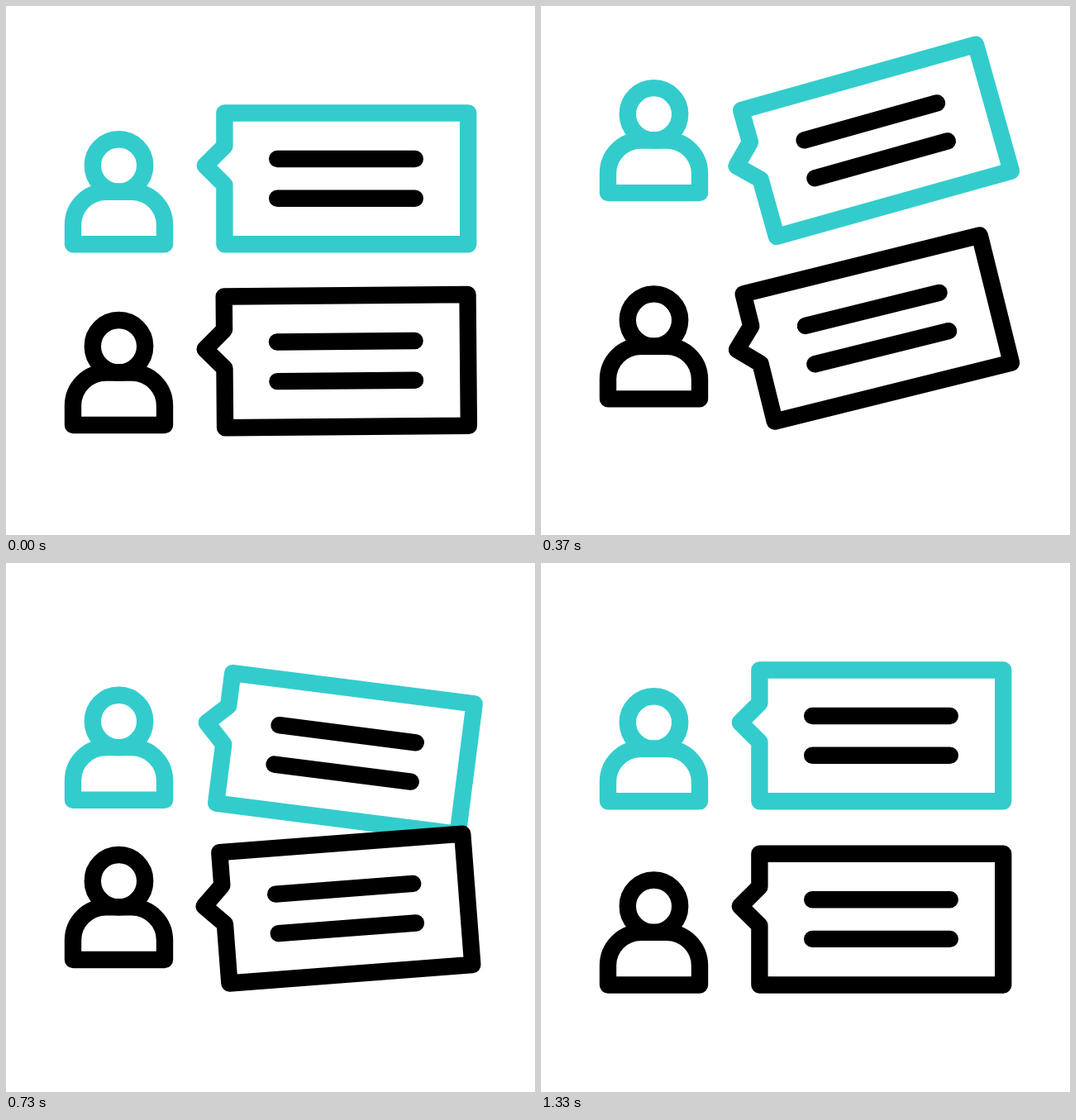
An HTML page with a canvas that plays this animation: 640x640 px, repeating every 1670 ms.

```html
<!DOCTYPE html>
<html lang="en">
<head>
<meta charset="utf-8">
<title>Chat bubbles</title>
<style>
  html, body { margin: 0; width: 100%; height: 100%; overflow: hidden; background: #fff; }
  canvas { display: block; width: 640px; height: 640px; }
</style>
</head>
<body>
<canvas id="stage" width="640" height="640"></canvas>
<script>
const ctx = document.getElementById('stage').getContext('2d');
const LOOP = 1670, FPS = 30, LAST_STEP = 40;
const TEAL = '#33cccc', BLACK = '#000';
const ROW_GAP = 222.2, ROW_LAG = 5;
const PIVOT = { x: 241, y: 208.8 };

// Turning points of the motion: step and value (pixels up, degrees).
const HOP = [[-1.7, 0], [6.5, -62.3], [16, 0], [21, -30.9], [29.7, 0]];
const TILT = [[-1.6, 0], [8.4, -17], [17.4, 7.3], [25.4, -10.2], [33.6, 0]];

function easeInOut(x) {
  return x < 0.5 ? (2 * x) ** 2.5 / 2 : 1 - (2 - 2 * x) ** 2.5 / 2;
}

function valueAt(keys, step) {
  let value = keys[0][1];
  for (let i = 1; i < keys.length; i++) {
    const [from, a] = keys[i - 1], [to, b] = keys[i];
    const progress = Math.min(1, Math.max(0, (step - from) / (to - from)));
    value += (b - a) * easeInOut(progress);
  }
  return value;
}

const head = new Path2D();
head.arc(136.5, 193, 31.7, 0, Math.PI * 2);
const body = new Path2D('M81 288.3V264.7A40 40 0 0 1 121 224.7H152A40 40 0 0 1 192 264.7V288.3Z');
const bubble = new Path2D('M264.4 129.5H559.2V288.3H264.4V216.4L240.8 193L264.4 169.6Z');
const lines = new Path2D('M328.2 185H494.8M328.2 232.7H494.8');

function drawRow(color, top, step) {
  ctx.save();
  ctx.translate(0, top);
  ctx.strokeStyle = color;

  ctx.save();
  ctx.translate(0, valueAt(HOP, step));
  ctx.stroke(head);
  ctx.stroke(body);
  ctx.restore();

  ctx.translate(PIVOT.x, PIVOT.y);
  ctx.rotate(valueAt(TILT, step) * Math.PI / 180);
  ctx.translate(-PIVOT.x, -PIVOT.y);
  ctx.stroke(bubble);
  ctx.strokeStyle = BLACK;
  ctx.stroke(lines);
  ctx.restore();
}

function draw() {
  const ms = performance.now() % LOOP;
  // Frame starts are rounded to 10 ms, hence the small allowance.
  const step = Math.min(LAST_STEP, Math.floor((ms + 3.4) * FPS / 1000));
  ctx.fillStyle = '#fff';
  ctx.fillRect(0, 0, 640, 640);
  ctx.lineWidth = 20.4;
  ctx.lineCap = ctx.lineJoin = 'round';
  drawRow(TEAL, 0, step - ROW_LAG);
  drawRow(BLACK, ROW_GAP, step);
  requestAnimationFrame(draw);
}
draw();
</script>
</body>
</html>
```
